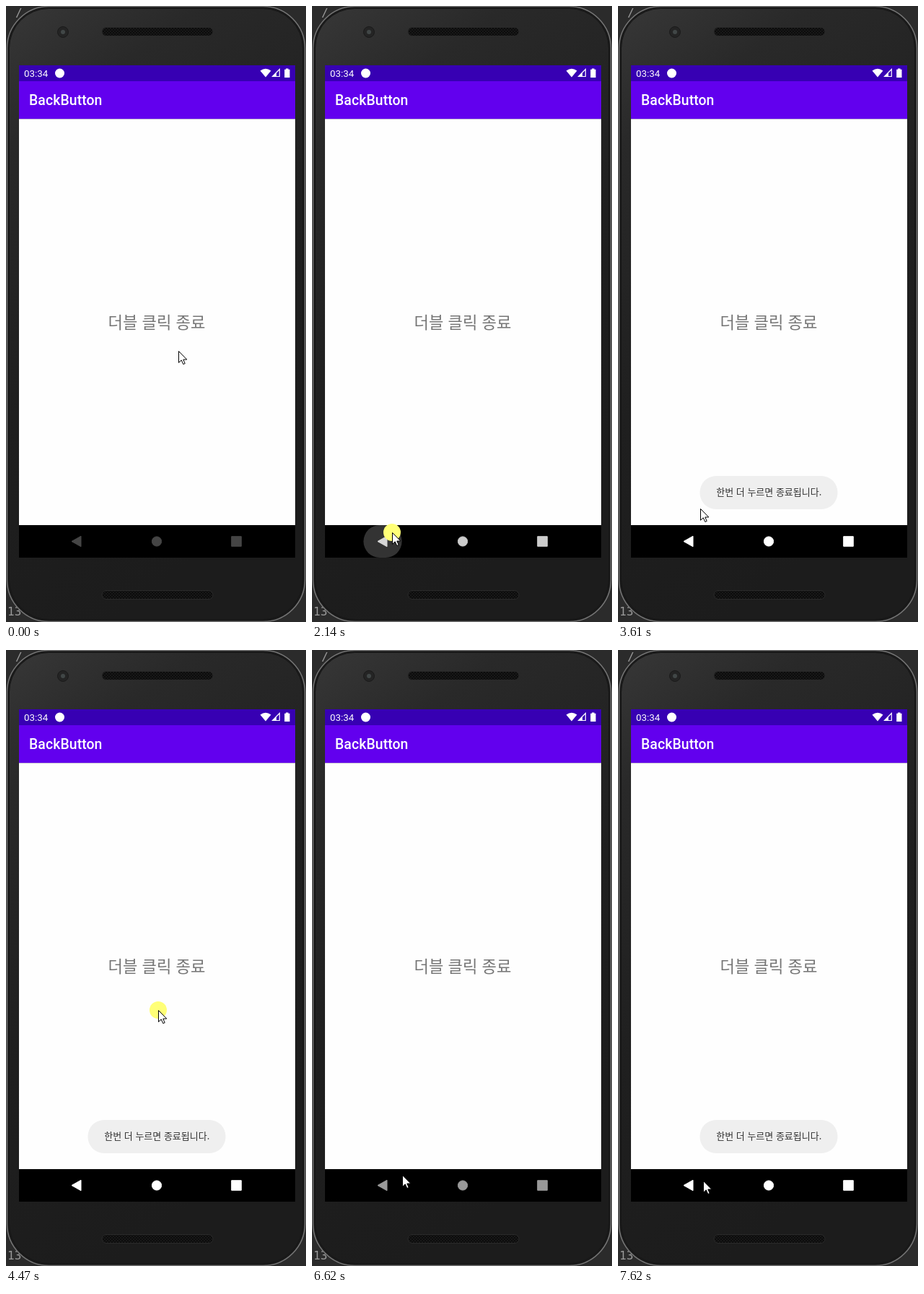
Animation, 416 px wide and 852 px high, one loop 8 s. Source, as an HTML page:

```html
<!DOCTYPE html>
<html lang="ko">
<head>
<meta charset="utf-8">
<style>
html, body { margin: 0; width: 100%; height: 100%; overflow: hidden; background: #2b2b2b; }
svg { display: block; width: 416px; height: 852px; }
.ui { font-family: Roboto, sans-serif; fill: #fff; }
.ko { font-family: "Noto Sans CJK KR", "Noto Sans CJK", sans-serif; text-anchor: middle; }
</style>
</head>
<body>
<svg viewBox="0 0 416 852">
  <defs>
    <linearGradient id="body" x2=".35" y2="1">
      <stop stop-color="#373737"/>
      <stop offset=".2" stop-color="#292929"/>
      <stop offset=".6" stop-color="#1f1f1f"/>
      <stop offset="1" stop-color="#1c1c1c"/>
    </linearGradient>
    <pattern id="mesh" width="4" height="4" patternUnits="userSpaceOnUse">
      <rect width="4" height="4" fill="#181818"/>
      <circle cx="1" cy="1" r="1" fill="#080808"/>
      <circle cx="3" cy="3" r="1" fill="#080808"/>
    </pattern>
  </defs>

  <!-- editor behind the phone -->
  <g font-family="DejaVu Sans Mono, monospace" font-size="16" fill="#999">
    <text x="13" y="15">/</text>
    <text x="2" y="843">13</text>
  </g>

  <!-- phone -->
  <rect x="1.5" y=".5" width="413" height="851" rx="58" fill="#1b1b1b" stroke="#777" stroke-width="1.5"/>
  <rect x="4.5" y="3.5" width="407" height="845" rx="55" fill="url(#body)" stroke="#161616"/>
  <circle cx="79" cy="36" r="7.5" fill="#242424" stroke="#1b1b1b"/>
  <circle cx="79" cy="36" r="3" fill="#414747"/>
  <g fill="url(#mesh)" stroke="#2a2a2a">
    <rect x="133" y="29.5" width="154" height="12" rx="6"/>
    <rect x="133" y="808.5" width="154" height="12" rx="6"/>
  </g>

  <!-- screen -->
  <rect x="18" y="82" width="383" height="22" fill="#3700b3"/>
  <rect x="18" y="104" width="383" height="52" fill="#6200ee"/>
  <rect x="18" y="156" width="383" height="562" fill="#fefefe"/>
  <rect x="18" y="156" width="383" height="1" fill="#c4bcd2"/>
  <rect x="18" y="718" width="383" height="45"/>
  <g class="ui">
    <text x="25" y="98" font-size="13.3">03:34</text>
    <text x="32" y="137" font-size="19.4" font-weight="500" letter-spacing=".1">BackButton</text>
    <circle cx="74.5" cy="93" r="6.5"/>
    <path d="M352.5 89.5Q360 84 367.5 89.5L360 98.5Z"/>
    <path d="M379.3 87.5V97.5H369.5Z" fill="none" stroke="#fff" stroke-width="1.2"/>
    <path d="M375 92V98H369Z"/>
    <path d="M388 86.5h3.5v1.3h2v11.2h-7.3v-11.2h1.8z"/>
  </g>
  <text class="ko" x="209" y="446" font-size="22.2" fill="#757575">더블 클릭 종료</text>

  <g id="toast">
    <rect x="113.5" y="650" width="191" height="46" rx="22.5" fill="#efefef"/>
    <text class="ko" x="209.3" y="677" font-size="13" fill="#333">한번 더 누르면 종료됩니다.</text>
  </g>

  <rect id="ripple" y="718" height="45" rx="22.5" fill="#fff"/>
  <g id="nav" fill="#fff" stroke="#fff" stroke-linejoin="round">
    <path d="M91 740.5L104 733.2V747.8Z"/>
    <circle cx="209" cy="740.5" r="6.6"/>
    <rect x="312.7" y="733.7" width="13.6" height="13.6"/>
  </g>

  <circle id="press" r="12" fill="#ff7"/>
  <path id="cursor" d="M.5 .5V16.3L4.2 12.8 6.8 18.5 9.2 17.5 6.8 12H11.8Z" fill="#fff" stroke="#000"/>
</svg>
<script>
const LOOP = 8000, START = 200, STEP = 77.2;
const backTaps = [24, 87], screenTap = 54;

// Pointer glides, in steps; bow bends the way sideways.
const glides = [
  { from: 9, to: 22, x: 111, y: 728, bow: 7 },
  { from: 43, to: 54, x: 211, y: 498, bow: -40 },
  { from: 55, to: 69, x: 241, y: 688, bow: 40 },
  { from: 74, to: 83, x: 125, y: 726, bow: 0 },
  { from: 83, to: 85, x: 118, y: 734, bow: 0 }
];

const clamp = v => Math.max(0, Math.min(1, v));
const set = (id, attrs) => {
  for (const key in attrs) document.getElementById(id).setAttribute(key, attrs[key]);
};

function pointer(k) {
  let x = k < 0 ? 239 : 238, y = 477;
  for (const g of glides) {
    const p = clamp((k - g.from) / (g.to - g.from));
    const ease = Math.sin(p * Math.PI / 2);
    x += (g.x - x) * ease + g.bow * Math.sin(p * Math.PI);
    y += (g.y - y) * ease;
  }
  return [Math.round(x), Math.round(y)];
}

// Rises after each back tap and falls again later.
const pulse = (k, on, rise, off, fall) => backTaps.reduce(
  (sum, t) => sum + clamp((k - t - on) / rise) - clamp((k - t - off) / fall), 0);

function draw(now) {
  const k = Math.floor((now % LOOP - START) / STEP);
  const [x, y] = pointer(k);
  const pressed = [...backTaps, screenTap].some(t => k === t || k === t + 1);
  set('cursor', { transform: `translate(${x} ${y})` });
  set('press', { cx: x, cy: y, opacity: pressed ? 1 : 0 });
  set('toast', { opacity: pulse(k, 2, 6, 47, 7) });

  const rest = k < backTaps[0] ? .27 : .6;
  set('nav', { opacity: rest + (1 - rest) * pulse(k, 0, 2, 31, 10) });

  const age = k - (k < backTaps[1] ? backTaps[0] : backTaps[1]);
  const width = 98 * clamp(.4 + age / 7);
  const glow = age < 0 ? 0 : clamp(1 - (age - 1.5) / 6);
  set('ripple', { x: 98 - width / 2, width, opacity: .2 * glow });
  requestAnimationFrame(draw);
}
requestAnimationFrame(draw);
</script>
</body>
</html>
```
